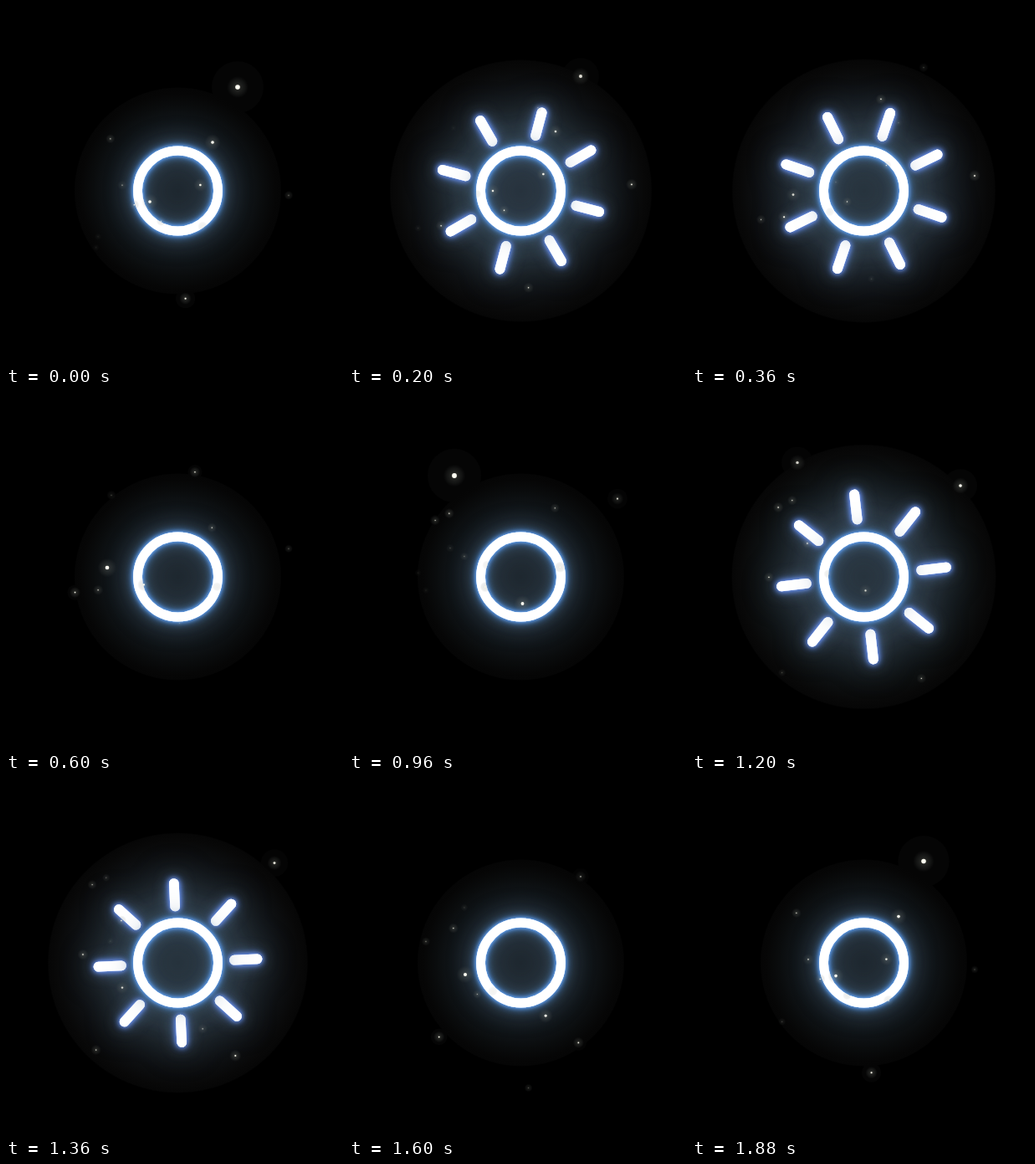
Animation, 403 px wide and 428 px high, one loop 1920 ms. Source, as an HTML page with a canvas:

```html
<!DOCTYPE html>
<html lang="en">
<head>
<meta charset="utf-8">
<title>Glowing sun</title>
<style>
html, body { margin: 0; width: 100%; height: 100%; overflow: hidden; background: #000; }
canvas { display: block; }
</style>
</head>
<body>
<canvas id="stage" width="403" height="428"></canvas>
<script>
const ctx = document.getElementById('stage').getContext('2d');
const LOOP = 1920, PULSE = 960, STEP = 40, TAU = Math.PI * 2;
const CX = 205.5, CY = 221, RING = 48;
const FADE = 400, RISE = 0.065;

const mix = (a, b, k) => a + (b - a) * k;

function seeded(seed) {
  return () => {
    seed = (seed * 1664525 + 1013904223) % 4294967296;
    return seed / 4294967296;
  };
}

// The brightest sparks: peak time, x, y, radius at the peak
const sparks = [
  [0, 277, 97, 2.8], [0, 247, 163, 1.8], [0, 172, 234, 1.8], [600, 121, 210, 2.3],
  [960, 126, 100, 2.9], [960, 207.5, 253, 1.9], [1200, 321, 112, 1.8], [1600, 139, 235, 2]
];

// Small sparks scattered over the glow
const random = seeded(7);
for (let i = 0; i < 20; i++) {
  const a = random() * TAU, d = 135 * Math.sqrt(random());
  sparks.push([i * LOOP / 20, CX + d * Math.cos(a), CY + d * Math.sin(a), 0.7 + 0.9 * random() ** 2]);
}

function disc(x, y, r, fill) {
  ctx.fillStyle = fill;
  ctx.beginPath();
  ctx.arc(x, y, r, 0, TAU);
  ctx.fill();
}

function radial(x, y, r, stops) {
  const g = ctx.createRadialGradient(x, y, 0, x, y, r);
  stops.forEach(([at, color]) => g.addColorStop(at, color));
  disc(x, y, r, g);
}

function glowStroke(path, width, glows) {
  ctx.lineWidth = width;
  ctx.lineCap = 'round';
  ctx.strokeStyle = '#fff';
  for (const [blur, color] of glows) {
    ctx.shadowBlur = blur;
    ctx.shadowColor = color;
    ctx.stroke(path);
  }
  ctx.shadowBlur = 0;
}

function drawHalo(out) {
  const level = mix(1, 1.3, out);
  const tone = (r, g, b) => `rgb(${r * level},${g * level},${b * level})`;
  radial(CX, CY, mix(124, 159, out), [
    [0, tone(31, 40, 48)], [0.35, tone(31, 41, 49)], [0.5, tone(26, 34, 41)],
    [0.65, tone(17, 22, 26)], [0.82, tone(10, 12, 13)], [0.94, tone(6, 6, 6)],
    [0.99, tone(5, 5, 5)], [1, '#000']
  ]);
}

function drawRays(t, out) {
  const turn = (10.3 + 45 * t / LOOP) * Math.PI / 180;
  const near = mix(RING, 69.5, out), far = mix(RING, 99.7, out);
  const path = new Path2D();
  for (let i = 0; i < 8; i++) {
    const a = turn + i * TAU / 8, c = Math.cos(a), s = Math.sin(a);
    path.moveTo(CX + near * c, CY + near * s);
    path.lineTo(CX + far * c, CY + far * s);
  }
  glowStroke(path, mix(9, 12, out), [
    [40, 'rgba(115,135,150,.6)'], [18, 'rgba(110,145,190,.8)'], [9, '#4a78f0'], [6, '#7fa6ff']
  ]);
}

function drawRing() {
  const path = new Path2D();
  path.arc(CX, CY, RING, 0, TAU);
  glowStroke(path, 10.8, [
    [32, 'rgba(100,130,155,.5)'], [16, 'rgba(95,140,190,.7)'], [8, '#4596ff'], [5, '#7ab4ff']
  ]);
}

function drawSpark(x, y, r, power) {
  ctx.globalAlpha = power;
  ctx.globalCompositeOperation = 'lighten';
  disc(x, y, r * 11, '#050505');
  ctx.globalCompositeOperation = 'source-over';
  radial(x, y, 4 + r * 3.2, [
    [0, 'rgba(215,215,195,.45)'], [0.3, 'rgba(150,155,145,.2)'],
    [0.7, 'rgba(110,115,110,.12)'], [1, 'rgba(90,95,95,0)']
  ]);
  disc(x, y, r, '#fffdf2');
  ctx.globalAlpha = 1;
}

function drawSparks(t) {
  for (const [peak, x, y, r] of sparks) {
    // signed time from the peak, across the loop's seam
    const dt = (t - peak + LOOP * 1.5) % LOOP - LOOP / 2;
    if (Math.abs(dt) >= FADE) continue;
    const power = Math.cos(dt / FADE * Math.PI / 2);
    drawSpark(x, y - dt * RISE, r * power, Math.sqrt(power));
  }
}

function draw(now) {
  const t = Math.floor(now % LOOP / STEP) * STEP;
  const out = Math.max(0, 1 - Math.abs(1 - t % PULSE / 290) ** 2.5);
  ctx.fillStyle = '#000';
  ctx.fillRect(0, 0, 403, 428);
  drawHalo(out);
  if (out > 0) drawRays(t, out);
  drawRing();
  drawSparks(t);
}

function tick() {
  draw(performance.now());
  requestAnimationFrame(tick);
}
tick();
</script>
</body>
</html>
```
